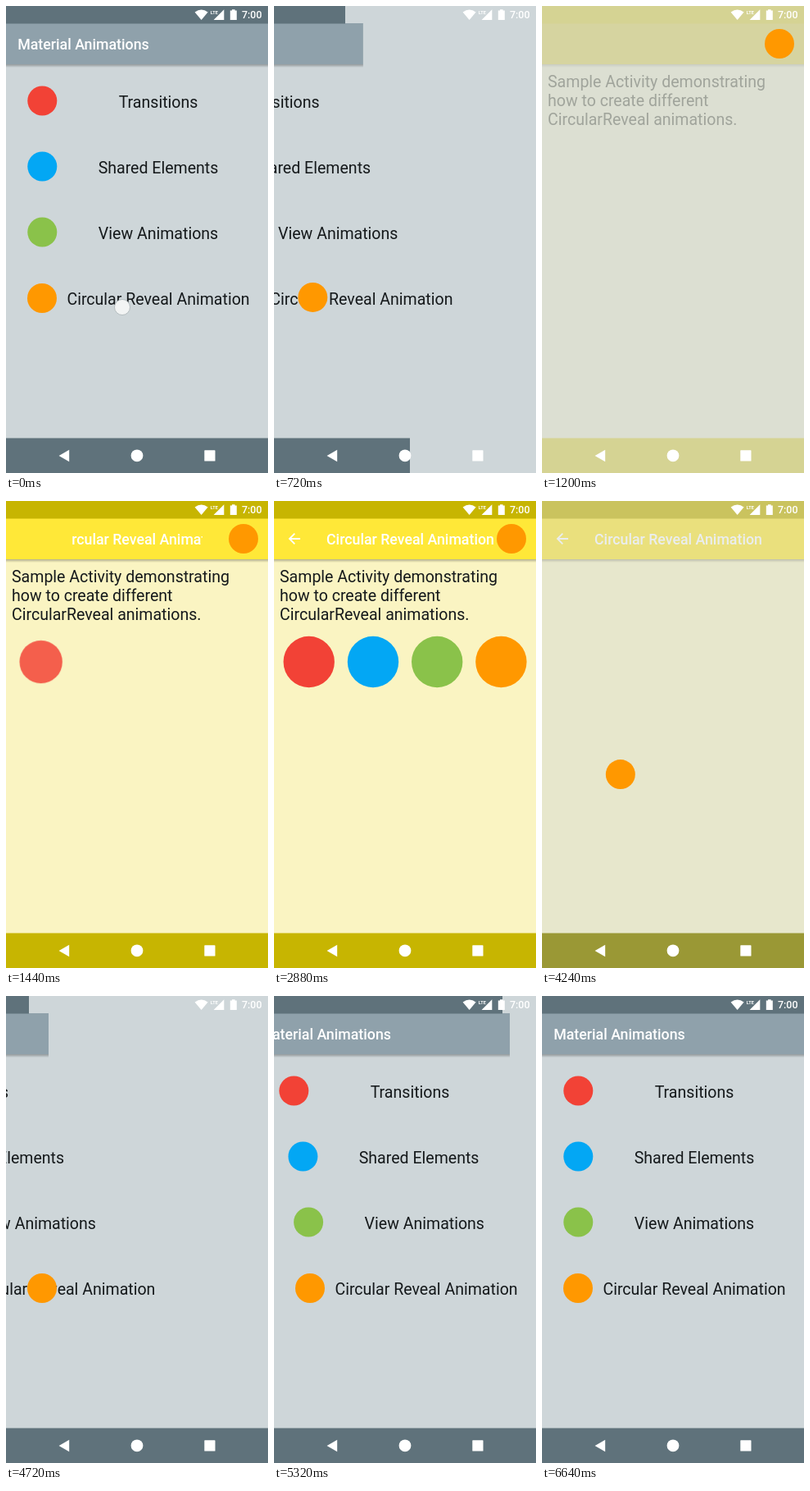
These frames come from a looping animation (320 px wide and 569 px high, 7400 ms). An HTML page:

```html
<!DOCTYPE html>
<html lang="en">
<head>
<meta charset="utf-8">
<title>Material Animations</title>
<style>
  html, body { margin: 0; width: 100%; height: 100%; overflow: hidden; background: #ced6d9; }
  body {
    position: relative;
    font-family: Roboto, "Noto Sans", sans-serif;
    --speed-up: cubic-bezier(.3333, 0, .6667, .3333);
    --slow-down: cubic-bezier(.3333, .6667, .6667, 1);
    --settle: cubic-bezier(0, 0, .2, 1);
    --standard: cubic-bezier(.4, 0, .2, 1);
  }
  svg, #detail { position: absolute; left: 0; top: 0; width: 320px; height: 569px; }
  /* The script below sets the time of every animation. */
  *, svg * { animation-play-state: paused !important; }

  .title { font-size: 17.78px; font-weight: 500; fill: #fff; }
  .large { font-size: 19.56px; fill: #15191b; }
  .row text { text-anchor: middle; }

  /* List screen: --d is the stagger in ms, by distance from the tapped row */
  .slide {
    animation:
      out 750ms var(--speed-up) calc(80ms + (356ms - var(--d)) * .75) both,
      back 1000ms var(--slow-down) calc(4320ms + var(--d)) forwards;
  }
  .slide.nav { animation: out 750ms var(--speed-up) 200ms both, back 1ms linear 3000ms forwards; }
  @keyframes out { from { transform: none; } to { transform: translateX(-320px); } }
  @keyframes back { from { transform: translateX(-320px); } to { transform: none; } }

  /* Detail screen */
  #detail { animation: fade-out 420ms linear 4060ms both; }
  .fade { animation: fade-in 300ms linear 1110ms both; }
  #bar { animation: brighten 240ms linear 1200ms both; }
  #note { animation: close 500ms ease-in-out 3560ms both; }
  #heading { animation: reveal 500ms var(--speed-up) 1190ms both; }
  #buttons circle {
    transform-box: fill-box;
    transform-origin: center;
    animation:
      grow 300ms var(--settle) calc(1290ms + var(--i) * 150ms) both,
      shrink 300ms var(--settle) calc(3560ms + var(--i) * 1ms) forwards;
  }
  @keyframes fade-in { from { opacity: 0; } to { opacity: 1; } }
  @keyframes fade-out { from { opacity: 1; } to { opacity: 0; } }
  @keyframes brighten { from { fill: #c9b82c; } to { fill: #ffe838; } }
  @keyframes reveal {
    from { clip-path: circle(0 at 160px 46px); }
    to { clip-path: circle(320px at 160px 46px); }
  }
  @keyframes close {
    from { clip-path: circle(320px at 160px 299px); }
    to { clip-path: circle(0 at 160px 299px); }
  }
  @keyframes grow { from { opacity: 0; transform: scale(0); } to { opacity: 1; transform: scale(1); } }
  @keyframes shrink { from { opacity: 1; transform: scale(1); } to { opacity: 0; transform: scale(0); } }

  /* Shared circle */
  #dot {
    position: absolute; left: 0; top: 0; width: 36px; height: 36px;
    border-radius: 50%;
    background: #ff9800;
    offset-path: path("M44 356C159.8 321.6 282.8 166.6 290 46");
    offset-rotate: 0deg;
    offset-anchor: center;
    animation: rise 500ms var(--standard) 690ms both, fall 500ms var(--standard) 3948ms forwards;
  }
  @keyframes rise { from { offset-distance: 0%; } to { offset-distance: 100%; } }
  @keyframes fall { from { offset-distance: 100%; } to { offset-distance: 0%; } }

  .touch { fill: #f2f4f4; stroke: #a9b1b4; stroke-width: .8; }
  #tap1 { animation: fade-out 80ms linear 60ms both; }
  #tap2 { fill: #fff; stroke: none; animation: press 40ms linear 3480ms both, lift 460ms linear 3600ms forwards; }
  @keyframes press { from { opacity: 0; } to { opacity: .7; } }
  @keyframes lift { from { opacity: .7; } to { opacity: 0; } }
</style>
</head>
<body>
<svg viewBox="0 0 320 569">
  <defs>
    <linearGradient id="shade" x2="0" y2="1">
      <stop stop-opacity=".28"/>
      <stop offset="1" stop-opacity="0"/>
    </linearGradient>
  </defs>
  <rect width="320" height="569" fill="#ced6d9"/>
  <g class="slide row" style="--d:250ms">
    <circle cx="44.3" cy="115.5" r="18" fill="#f24236"/>
    <text class="large" x="186" y="123.5">Transitions</text>
  </g>
  <g class="slide row" style="--d:167ms">
    <circle cx="44.3" cy="195.5" r="18" fill="#03a7f4"/>
    <text class="large" x="186" y="203.5">Shared Elements</text>
  </g>
  <g class="slide row" style="--d:83ms">
    <circle cx="44.3" cy="275.5" r="18" fill="#8ac24a"/>
    <text class="large" x="186" y="283.5">View Animations</text>
  </g>
  <g class="slide row" style="--d:0ms">
    <text class="large" x="186" y="363.5">Circular Reveal Animation</text>
  </g>
  <g class="slide" style="--d:315ms">
    <rect y="71" width="320" height="4" fill="url(#shade)"/>
    <rect y="21" width="320" height="50" fill="#8fa1ab"/>
    <text class="title" x="14.2" y="52.8">Material Animations</text>
  </g>
  <rect class="slide" style="--d:356ms" width="320" height="21.5" fill="#5f727b"/>
  <rect class="slide nav" y="526.5" width="320" height="42.5" fill="#5f727b"/>
</svg>

<div id="detail">
  <svg viewBox="0 0 320 569">
    <rect class="fade" width="320" height="569" fill="#faf4c2"/>
    <g class="fade">
      <rect y="71" width="320" height="4" fill="url(#shade)"/>
      <rect id="bar" y="21" width="320" height="50"/>
      <rect width="320" height="21.5" fill="#c7b501"/>
      <rect y="526.5" width="320" height="42.5" fill="#c7b501"/>
    </g>
  </svg>
  <svg id="note" viewBox="0 0 320 569">
    <g class="fade large">
      <text x="7" y="99">Sample Activity demonstrating</text>
      <text x="7" y="122">how to create different</text>
      <text x="7" y="145">CircularReveal animations.</text>
    </g>
  </svg>
  <svg id="heading" viewBox="0 0 320 569">
    <path d="M32 46H19.5M25.3 39.6L18.9 46L25.3 52.4" fill="none" stroke="#fff" stroke-width="1.8"/>
    <text class="title" x="64" y="52.8">Circular Reveal Animation</text>
  </svg>
  <svg id="buttons" viewBox="0 0 320 569">
    <circle style="--i:0" cx="42.7" cy="196" r="31.2" fill="#f24236"/>
    <circle style="--i:1" cx="121" cy="196" r="31.2" fill="#03a7f4"/>
    <circle style="--i:2" cx="199.2" cy="196" r="31.2" fill="#8ac24a"/>
    <circle style="--i:3" cx="277.4" cy="196" r="31.2" fill="#ff9800"/>
  </svg>
</div>

<div id="dot"></div>

<svg viewBox="0 0 320 569">
  <circle id="tap1" class="touch" cx="142" cy="367" r="9.5"/>
  <circle id="tap2" class="touch" cx="22.5" cy="44.5" r="10.5"/>
  <g fill="#fff">
    <path d="M238.6 17L230.6 7.4Q238.6 1.6 246.6 7.4Z"/>
    <path d="M266.3 4.3V17H253.6Z"/>
    <path d="M273.8 5.4H276V4.2H279.6V5.4H281.8V17H273.8Z"/>
    <text x="249.8" y="9.6" font-size="5.6" font-weight="700">LTE</text>
    <text x="288" y="15.3" font-size="12.44" font-weight="500">7:00</text>
    <path d="M64.6 548L77.2 540.8V555.2Z"/>
    <circle cx="160" cy="547.8" r="7.4"/>
    <rect x="242.3" y="541.3" width="13.2" height="13.2" rx=".6"/>
  </g>
</svg>

<script>
  const LOOP = 7400, STEP = 120, SECOND_HALF = 3520;
  const anims = document.getAnimations();
  const start = performance.now();

  // The picture advances in 120 ms steps, with one longer step midway.
  function snap(t) {
    const step = v => Math.floor(v / STEP) * STEP;
    return t < SECOND_HALF
      ? Math.min(step(t), SECOND_HALF - 160)
      : SECOND_HALF + step(t - SECOND_HALF);
  }

  function draw() {
    const t = snap((performance.now() - start) % LOOP);
    for (const a of anims) a.currentTime = t;
    requestAnimationFrame(draw);
  }
  draw();
</script>
</body>
</html>
```
